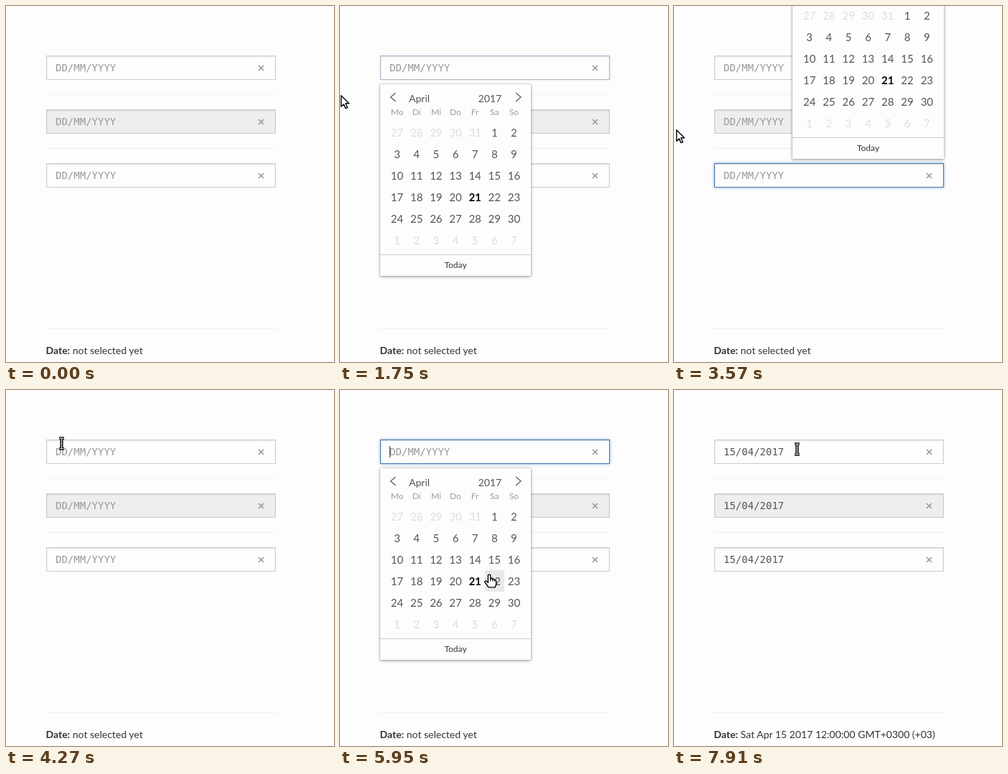
An HTML page that plays this animation: 457 px wide and 496 px high, repeating every 8 s.

```html
<!DOCTYPE html>
<html lang="en">
<head>
<meta charset="utf-8">
<title>Date picker</title>
<style>
  html, body { margin: 0; width: 100%; height: 100%; overflow: hidden; background: #fdfdfd; }
  body { position: relative; font: 14px/20px Lato, sans-serif; color: #333; }
  div, svg, i { position: absolute; box-sizing: border-box; }
  .field {
    left: 56px; width: 320px; height: 34px; padding-left: 12px;
    border: 1px solid #ccc; box-shadow: inset 0 1px 2px rgba(0,0,0,.12);
    font: 14px/32px "DejaVu Sans Mono", monospace; color: #999; white-space: pre;
  }
  .field.off { background: #eee; }
  .field.set { color: #555; }
  .field svg { left: 294px; top: 12px; }
  .ring { inset: -1px; border: 1px solid #4377ad; box-shadow: 0 0 4px rgba(70,130,190,.65); }
  .caret { left: 12px; top: 8px; width: 1px; height: 16px; background: #333; }
  .rule { left: 56px; width: 320px; height: 1px; background: #eee; }
  #status { left: 55.5px; top: 470px; white-space: pre; }
  .picker {
    height: 267px; background: #fdfdfd; color: #555;
    box-shadow: 0 1px 4px rgba(0,0,0,.42), 0 0 1px rgba(0,0,0,.3);
  }
  .picker > svg { left: 0; top: 0; }
  .month { left: 40px; top: 10px; }
  .year { right: 41px; top: 10px; }
  .grid { left: 10px; right: 10px; display: grid; grid-template-columns: repeat(7, 1fr); text-align: center; }
  .names { top: 29px; font-size: 12px; line-height: 19px; color: #8fa19e; }
  .days { top: 52px; font-size: 15px; line-height: 30px; }
  .days .out { color: #ddd; }
  .days .now { color: #000; font-weight: bold; }
  .days .hover { background: #e9e9e9; }
  .today {
    left: 0; right: 0; top: 237px; height: 30px; border-top: 1px solid #ccc;
    font-size: 12px; line-height: 28px; text-align: center; color: #333;
  }
  #cursor { left: 0; top: 0; overflow: visible; }
  #cursor g { display: none; stroke-linejoin: round; }
  #cursor .arrow, #cursor .hand { fill: #fff; stroke: #000; stroke-width: 1.4; }
  #cursor .beam { fill: none; }
</style>
</head>
<body>
<div class="rule" style="top:123px"></div>
<div class="rule" style="top:198px"></div>
<div class="rule" style="top:449px"></div>
<div id="status"><b>Date:</b> <span></span></div>
<svg id="cursor" width="1" height="1">
  <g class="arrow"><path d="M.6 .8V16.2L4.2 12.9L6.8 18.6L9.3 17.5L6.8 11.8H11.6Z"/></g>
  <g class="beam">
    <path id="bar" d="M-3.2-7.2H-1L0-6.4L1-7.2H3.2M0-6.4V6.4M-3.2 7.2H-1L0 6.4L1 7.2H3.2" stroke="#000" stroke-width="3.6"/>
    <use href="#bar" style="stroke:#fff"/>
    <path d="M-3.2-7.2H3.2M0-6.4V6.4M-3.2 7.2H3.2" stroke="#fff" stroke-width="1"/>
  </g>
  <g class="hand">
    <path d="M-1.7 9V1Q-1.7-.4 0-.4Q1.6-.4 1.6 1V5.6Q4.6 4.8 4.8 6.4Q7.2 5.8 7.4 7.4Q9.6 7 9.6 9V12.5Q9.4 15 8 17.4H-1.2Q-2.6 14.5-5.6 11.3Q-7 9.4-5.6 8.6Q-4.4 8-1.7 11Z"/>
    <path d="M1.6 5.6V9M4.8 6.4V9M7.4 7.4V9.4" stroke-width="1"/>
  </g>
</svg>
<script>
const FRAME = 70, LOOP = 8000, LAST = 7910, FADE = 280, PICKED = 7140;
const cursor = document.getElementById('cursor');
const status = document.querySelector('#status span');

function add(parent, cls, text = '') {
  const el = document.createElement('div');
  el.className = cls;
  el.textContent = text;
  parent.append(el);
  return el;
}

function makeField(top, cls = '') {
  const el = add(document.body, 'field ' + cls);
  el.style.top = top + 'px';
  el.innerHTML = '<span></span><svg width="9" height="9"><path d="M1 1L8 8M8 1L1 8" stroke="#999" stroke-width="1.6"/></svg>';
  return { el, top, text: el.firstChild, ring: add(el, 'ring'), caret: add(el, 'caret') };
}

function makePicker(left, top, width) {
  const el = add(document.body, 'picker');
  Object.assign(el.style, { left: left + 'px', top: top + 'px', width: width + 'px' });
  el.innerHTML = `<svg width="${width}" height="36" fill="none" stroke="#555" stroke-width="1.1">
    <path d="M21.5 12L14.5 18L21.5 24M${width - 21} 12L${width - 14} 18L${width - 21} 24"/></svg>`;
  add(el, 'month', 'April');
  add(el, 'year', '2017');
  const names = add(el, 'grid names');
  for (const name of 'Mo Di Mi Do Fr Sa So'.split(' ')) names.append(Object.assign(document.createElement('span'), { textContent: name }));
  const days = add(el, 'grid days');
  for (let i = 0; i < 42; i++) {
    const n = i - 4, cell = document.createElement('span');
    cell.textContent = n < 1 ? n + 31 : n > 30 ? n - 30 : n;
    cell.className = n < 1 || n > 30 ? 'out' : n === 21 ? 'now' : '';
    days.append(cell);
  }
  add(el, 'today', 'Today');
  return { el, left, top, width, cells: [...days.children] };
}

const fields = [makeField(69), makeField(144, 'off'), makeField(219)];
const below = makePicker(56, 109, 210);
const above = makePicker(165, -54, 211);
document.body.append(cursor);

// Focus and opening times of each visit to a field
const visits = [
  { field: fields[0], picker: below, focus: [560, 1680], open: [630, 1750] },
  { field: fields[2], picker: above, focus: [2730, 3570], open: [2800, 3640], caretEnd: 3300 },
  { field: fields[0], picker: below, focus: [4410, 6860], open: [4480, PICKED] }
];

// Pointer path: time, x, y
const path = [
  [280, 0, 56], [560, 84, 92.5], [1050, 84, 92.5], [1610, 1, 124], [1960, 1, 124],
  [2380, 75, 205], [2520, 104, 213], [2660, 130, 235], [2940, 130, 235], [3570, 3, 172],
  [3780, 3, 172], [4270, 77.5, 74.5], [4480, 77.5, 74.5], [4690, 99, 86], [5530, 99, 86],
  [5740, 272, 308], [5810, 272, 308], [5950, 208, 257.5], [6020, 162, 229], [6160, 162, 229],
  [6510, 215, 229], [7210, 215, 229], [7910, 171.5, 82.5]
];

const clamp = v => Math.max(0, Math.min(1, v));
const ease = p => 1 - (1 - clamp(p)) ** 2;
const pulse = (t, [a, b], d) => ease((t - a) / d) * (1 - ease((t - b) / d));

function pointer(t) {
  const i = path.findIndex(p => p[0] >= t);
  if (i < 1) return path[0].slice(1);
  const [a, x, y] = path[i - 1], [b, u, v] = path[i], k = (t - a) / (b - a);
  return [x + (u - x) * k, y + (v - y) * k];
}

function hitCell(p, x, y) {
  const col = Math.floor((x - p.left - 10) / (p.width - 20) * 7);
  const row = Math.floor((y - p.top - 52) / 30);
  return col >= 0 && col < 7 && row >= 0 && row < 6 ? row * 7 + col : -1;
}

function render(t) {
  const [x, y] = pointer(t);
  const picked = t >= PICKED;
  let shape = fields.some(f => x >= 56 && x < 376 && y >= f.top && y < f.top + 34) ? 'beam' : 'arrow';

  for (const f of fields) {
    f.text.textContent = picked ? '15/04/2017' : 'DD/MM/YYYY';
    f.el.classList.toggle('set', picked);
    f.ring.style.opacity = f.caret.style.opacity = 0;
  }
  for (const p of [below, above]) {
    const shown = Math.max(...visits.map(v => v.picker === p ? pulse(t, v.open, FADE) : 0));
    p.el.style.opacity = shown;
    p.el.style.visibility = shown ? 'visible' : 'hidden';
    const inside = shown > .3 && x >= p.left && x < p.left + p.width && y >= p.top && y < p.top + 267;
    const hit = inside ? hitCell(p, x, y) : -1;
    p.cells.forEach((c, i) => c.classList.toggle('hover', i === hit));
    if (inside) shape = hit < 0 ? 'arrow' : 'hand';
  }
  for (const { field, focus, caretEnd = LOOP } of visits) {
    const k = pulse(t, focus, 140);
    if (!k) continue;
    field.ring.style.opacity = k;
    field.caret.style.opacity = t <= focus[1] && t < caretEnd ? 1 : 0;
  }
  status.textContent = picked ? 'Sat Apr 15 2017 12:00:00 GMT+0300 (+03)' : 'not selected yet';

  for (const g of cursor.children) {
    g.style.display = t >= path[0][0] && g.classList.contains(shape) ? 'inline' : 'none';
  }
  cursor.style.transform = `translate(${x}px, ${y}px)`;
}

const start = performance.now();
function tick() {
  const t = (performance.now() - start) % LOOP;
  render(Math.min(LAST, Math.floor(t / FRAME) * FRAME));
  requestAnimationFrame(tick);
}
tick();
</script>
</body>
</html>
```
